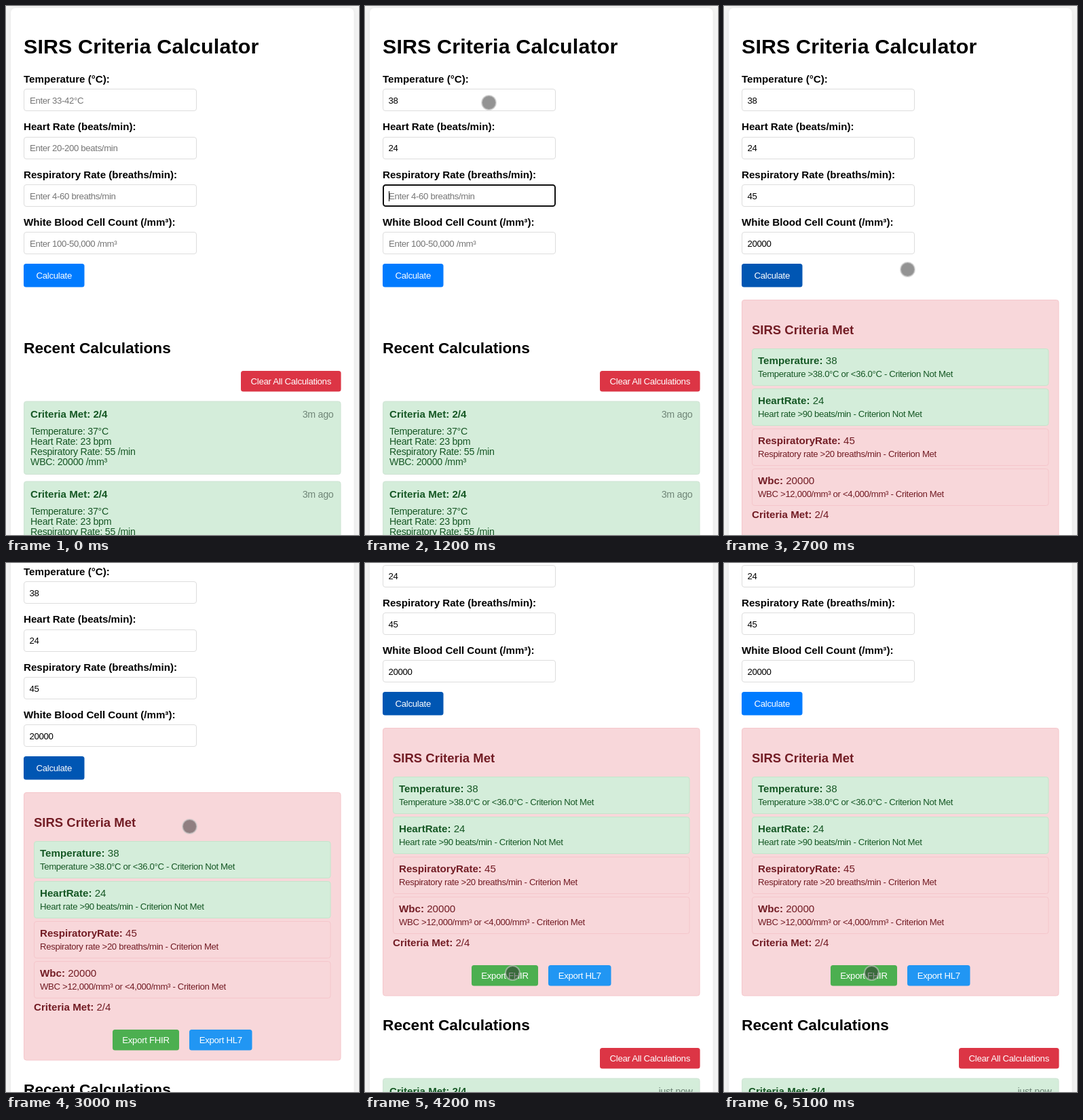
Write an HTML page that moves like this. It is 520 px wide and 780 px high and loops after 5400 ms.

```html
<!DOCTYPE html>
<html lang="en">
<head>
<meta charset="utf-8">
<title>SIRS Criteria Calculator</title>
<style>
  html, body { margin: 0; width: 100%; height: 100%; overflow: hidden; background: #f4f4f4; }
  svg { display: block; width: 520px; height: 780px; font-family: "Liberation Sans", Arial, sans-serif; }
  text { white-space: pre; }
  .small { font-size: 13.2px; letter-spacing: -.35px; }
  .button { font-size: 13.2px; letter-spacing: -.28px; text-anchor: middle; }
  .card { font-size: 14.2px; letter-spacing: -.25px; }
  .age { text-anchor: end; }
  .body { font-size: 15.13px; }
  .title { font-size: 30.4px; letter-spacing: .15px; }
  .heading { font-size: 22.7px; }
  .subheading { font-size: 18.5px; }
  .bold, .title, .heading, .subheading { font-weight: bold; }
  .panel { filter: drop-shadow(0 0 4px rgba(0, 0, 0, .06)); }
</style>
</head>
<body>
<svg id="stage" viewBox="0 0 520 780"></svg>
<script>
const stage = document.getElementById('stage');
const STEP = 300, LOOP = 5400;
const RESULT_HEIGHT = 367;
const GREEN = { bg: '#d4edda', line: '#c3e6cb', ink: '#155724' };
const RED = { bg: '#f8d7da', line: '#f5c6cb', ink: '#721c24' };

// typed: [step, value] pairs; focus: [first step, end step]
const fields = [
  { label: 'Temperature (°C):', hint: 'Enter 33-42°C', typed: [[2, '38']], focus: [1, 3] },
  { label: 'Heart Rate (beats/min):', hint: 'Enter 20-200 beats/min', typed: [[4, '24']], focus: [3, 4] },
  { label: 'Respiratory Rate (breaths/min):', hint: 'Enter 4-60 breaths/min', typed: [[6, '45']], focus: [4, 7] },
  { label: 'White Blood Cell Count (/mm³):', hint: 'Enter 100-50,000 /mm³', typed: [[7, '20'], [8, '20000']], focus: [7, 9] }
];

const criteria = [
  ['Temperature:', '38', 'Temperature >38.0°C or <36.0°C - Criterion Not Met', GREEN],
  ['HeartRate:', '24', 'Heart rate >90 beats/min - Criterion Not Met', GREEN],
  ['RespiratoryRate:', '45', 'Respiratory rate >20 breaths/min - Criterion Met', RED],
  ['Wbc:', '20000', 'WBC >12,000/mm³ or <4,000/mm³ - Criterion Met', RED]
];

// [first step, x, y]
const pointer = [
  [1, 182.5, 145.5], [2, 182.5, 142.5], [8, 133.5, 309.5], [9, 270.5, 388.5],
  [12, 256.5, 446.5], [13, 225.5, 588.5], [14, 217.5, 604.5]
];

const latest = (list, step) => list.filter(item => item[0] <= step).pop();
const escape = s => s.replace(/</g, '&lt;').replace(/>/g, '&gt;');

const text = (x, y, style, fill, s) =>
  `<text x="${x}" y="${y}" class="${style}" fill="${fill}">${escape(s)}</text>`;

const pair = (x, y, fill, name, value) =>
  `<text x="${x}" y="${y}" class="body" fill="${fill}"><tspan class="bold">${name}</tspan> ${value}</text>`;

const box = (x, y, w, h, fill, line = 'none', weight = 1) => {
  const inset = line === 'none' ? 0 : weight / 2;
  return `<rect x="${x + inset}" y="${y + inset}" width="${w - 2 * inset}" height="${h - 2 * inset}"
    rx="3.5" fill="${fill}" stroke="${line}" stroke-width="${weight}"/>`;
};

const button = (x, y, w, h, fill, s) =>
  box(x, y, w, h, fill) + text(x + w / 2, y + Math.round(h / 2 + 4.6), 'button', '#fff', s);

function field(f, i, step) {
  const y = i * 70.3;
  const base = Math.round(144 + y);
  const focused = step >= f.focus[0] && step < f.focus[1];
  const value = latest(f.typed, step);
  const [line, weight] = focused ? ['#101010', 2] : ['#ddd', 1];
  let out = text(26, Math.round(113 + y), 'body bold', '#000', f.label)
    + box(26, Math.floor(122.7 + y), 255, 33, '#fff', line, weight);
  out += value ? text(34.5, base, 'small', '#000', value[1]) : text(35, base, 'small', '#757575', f.hint);
  if (focused && !value) out += `<rect x="35" y="${base - 12}" width="1" height="15"/>`;
  return out;
}

function results() {
  let out = box(26, 433, 467.5, 395.5, RED.bg, RED.line)
    + text(41, 484, 'subheading', RED.ink, 'SIRS Criteria Met');
  criteria.forEach(([name, value, note, tone], i) => {
    const y = 505 + i * 59;
    out += box(41, y, 437.5, 55, tone.bg, tone.line)
      + pair(50, y + 23, tone.ink, name, value)
      + text(50, y + 42, 'small', tone.ink, note);
  });
  return out + pair(41, 755, RED.ink, 'Criteria Met:', '2/4')
    + button(157, 783, 98, 30.5, '#4caf50', 'Export FHIR')
    + button(270, 783, 92.5, 30.5, '#2196f3', 'Export HL7');
}

function card(y, age) {
  const lines = ['Temperature: 37°C', 'Heart Rate: 23 bpm', 'Respiratory Rate: 55 /min', 'WBC: 20000 /mm³'];
  return box(26, y, 467.5, 108.5, GREEN.bg, '#cfe3d4')
    + text(36, y + 24, 'body bold', GREEN.ink, 'Criteria Met: 2/4')
    + text(482.5, y + 24, 'card age', '#6f8577', age)
    + lines.map((s, i) => text(36, Math.round(y + 49 + i * 15.3), 'card', GREEN.ink, s)).join('');
}

function history(done) {
  return `<g transform="translate(0 ${done ? RESULT_HEIGHT : 0})">`
    + text(26, 512, 'heading', '#000', 'Recent Calculations')
    + button(346, 538, 147.5, 30.5, '#dc3545', 'Clear All Calculations')
    + card(582.5, done ? 'just now' : '3m ago') + card(700.5, '3m ago') + '</g>';
}

function draw(step) {
  const done = step >= 9;
  const scroll = step >= 11 ? 190 : step === 10 ? 95 : 0;
  const hovered = done && step < 15;
  const spot = latest(pointer, step);
  stage.innerHTML = `<g transform="translate(0 ${-scroll})">
    <rect class="panel" x="7" y="3" width="505.5" height="1300" rx="7" fill="#fff"/>`
    + text(26, 70, 'title', '#000', 'SIRS Criteria Calculator')
    + fields.map((f, i) => field(f, i, step)).join('')
    + button(26, 380, 89.5, 34.5, hovered ? '#0056b3' : '#007bff', 'Calculate')
    + (done ? results() : '') + history(done) + '</g>'
    + (spot ? `<circle cx="${spot[1]}" cy="${spot[2]}" r="10.5" fill="rgba(40,40,40,.5)"
        stroke="rgba(200,200,200,.6)" stroke-width="2"/>` : '');
}

let shown = -1;
const start = performance.now();
function tick() {
  const step = Math.floor((performance.now() - start) % LOOP / STEP);
  if (step !== shown) draw(shown = step);
  requestAnimationFrame(tick);
}
tick();
</script>
</body>
</html>
```
